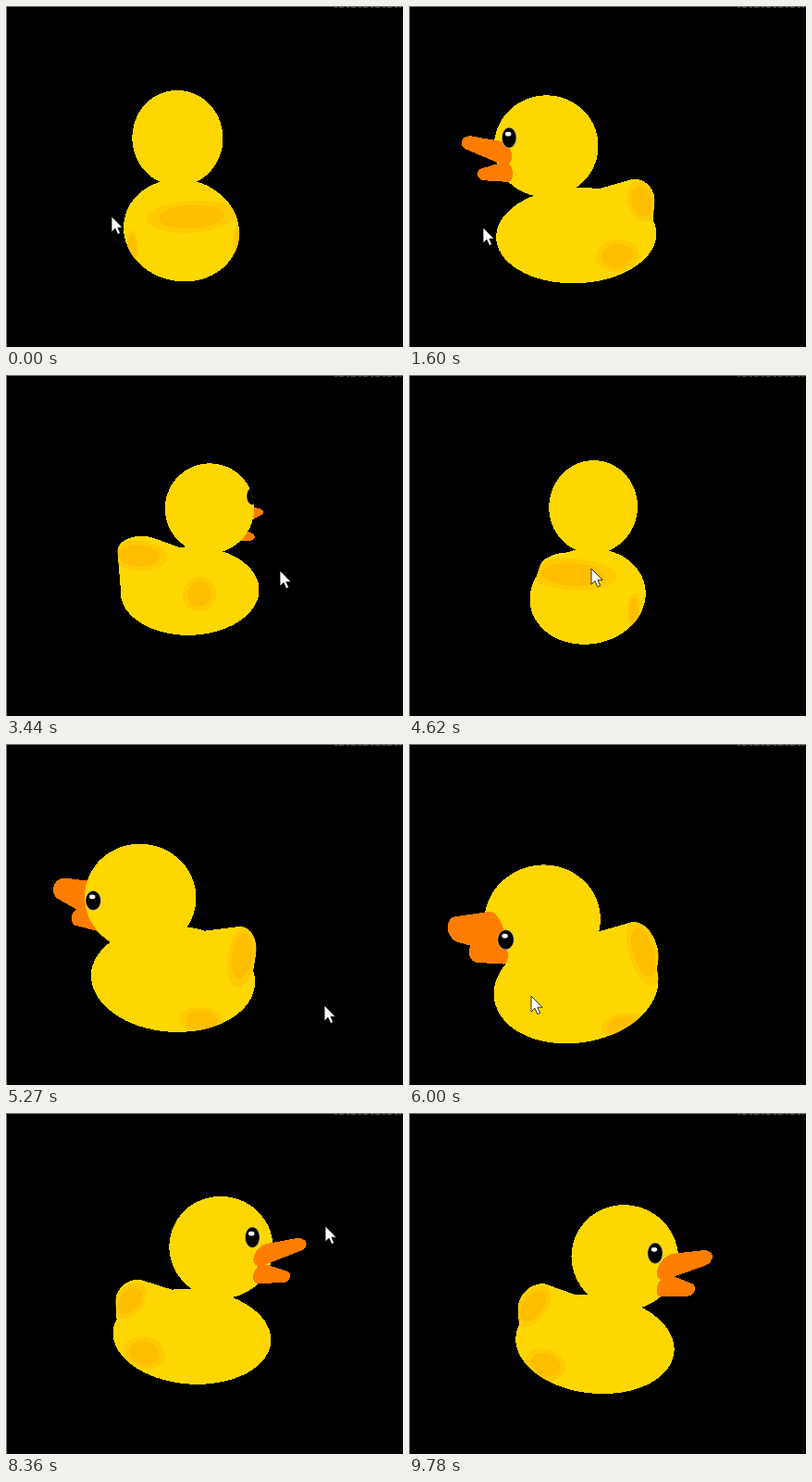
An HTML page that plays this animation: 429x368 px, repeating every 9.88 s.

```html
<!DOCTYPE html>
<html lang="en">
<head>
<meta charset="utf-8">
<title>Turning duck</title>
<style>
html, body { margin: 0; width: 100%; height: 100%; overflow: hidden; background: #000; }
svg { display: block; width: 429px; height: 368px; }
</style>
</head>
<body>
<svg viewBox="0 0 429 368">
  <defs>
    <clipPath id="bodyClip"><path id="bodyClipPath"/></clipPath>
    <clipPath id="headClip"><path id="headClipPath"/></clipPath>
  </defs>
  <rect width="429" height="368"/>
  <path d="M0 .5H429M.5 0V368" stroke="#777"/>
  <path d="M355 1.5H427" stroke="#444" stroke-dasharray="3 2 5 3"/>
  <g shape-rendering="crispEdges">
    <path id="beakBack" fill="#ff7d00"/>
    <path id="body" fill="#ffd700"/>
    <g id="patches" clip-path="url(#bodyClip)"></g>
    <path id="head" fill="#ffd700"/>
    <path id="beakFront" fill="#ff7d00"/>
  </g>
  <g id="eyes" clip-path="url(#headClip)"></g>
  <path id="cursor" d="M0 0V17L4 13.2L6.8 19.5L9.6 18.3L6.9 12.2H12Z" fill="#fff" stroke="#000" stroke-width=".8"/>
</svg>
<script>
const LOOP = 9880, CAMERA = 600, PIVOT = { x: 191, y: 295 };
const byId = id => document.getElementById(id);
const rad = deg => deg * Math.PI / 180;

// The picture is held between steps: start, end, number of steps.
const RUNS = [[140, 1070, 8], [1200, 2180, 8], [2330, 3290, 8], [3440, 4350, 8], [4500, 5540, 9],
  [5690, 6600, 7], [6750, 7670, 7], [7820, 8770, 8], [8920, 9780, 7]];
const STEPS = [0, ...RUNS.flatMap(([from, to, n]) =>
  Array.from({ length: n }, (_, i) => from + (to - from) * i / (n - 1)))];

// time, turn, tilt, lift, cursor x, cursor y
const KEYS = [
  [0, 8, 22, -2, 114, 227],
  [950, 97, 21, 0, 225, 236],
  [1200, 97, 22, 0, 200, 240],
  [1620, 97, 22, 0, 80, 239],
  [2180, 205, 4, -13, 304, 222],
  [2600, 207, 3, -14, 121, 215],
  [3440, 310, 3, -12, 296, 211],
  [3600, 316, 4, -12, 313, 212],
  [4050, 316, 5, -11, 80, 203],
  [4630, 348, 16, -5, 197, 209],
  [5400, 461, 47, -1, 371, 295],
  [5690, 463, 50, 0, 371, 298],
  [5993, 463, 50, 0, 132, 272],
  [6650, 530, 70, 0, 225, 355],
  [7210, 593, 55, 0, 310, 207],
  [7670, 602, 28, -3, 317, 120],
  [8000, 606, 20, -6, 330, 62],
  [8770, 624, 19, -6, 361, 190],
  [9600, 613, 26, 0, 361, 372],
  [9780, 612, 26, 0, 361, 400]
];

// Ellipsoids: centre and half axes, each as left, up, forward.
const BODY = { at: [0, 50, 10], size: [61, 48, 84] };
const REAR = { at: [0, 58, -22], size: [50, 38, 48] };
const TAIL = { at: [0, 88, -53], size: [33, 16, 18] };
const HEAD = { at: [0, 142, 39], size: [47.5, 50, 51] };
const onHead = (l, u, f, size) => ({ at: [l, 142 + u, 39 + f], size });
const UPPER_BEAK = [onHead(0, -6, 42, [24, 8, 8]), onHead(0, 4, 72, [14, 5, 9])];
const LOWER_BEAK = [onHead(0, -24, 40, [18, 8, 6]), onHead(0, -26, 62, [10, 5, 6])];

const patch = (normal, at, size) => [["#ffcb00", 1], ["#ffbe00", .72]].map(([fill, k]) =>
  ({ fill, normal, shape: { at, size: size.map(v => v * k) } }));
const PATCHES = [
  ...patch([0, .7, -.7], [0, 84, -58], [42, 15, 14]),
  ...[1, -1].flatMap(side => patch([side, 0, -.2], [side * 54, 45, -24], [5, 17, 21]))
];
const EYES = [1, -1].map(side => ({
  normal: [side * .68, .28, .74],
  shape: onHead(side * 32, 13, 35, [6.5, 9.5, 6.5])
}));

function addShape(parent, tag, attrs) {
  const el = document.createElementNS("http://www.w3.org/2000/svg", tag);
  for (const name in attrs) el.setAttribute(name, attrs[name]);
  return byId(parent).appendChild(el);
}
for (const p of PATCHES) p.el = addShape("patches", "path", { fill: p.fill });
for (const e of EYES) {
  e.el = addShape("eyes", "path", { fill: "#000", stroke: "#bba", "stroke-width": .7 });
  e.glint = addShape("eyes", "ellipse", { rx: 3.2, ry: 2.4, fill: "#fff" });
}

function makeView(turn, tilt, lift) {
  const st = Math.sin(rad(turn)), ct = Math.cos(rad(turn));
  const sp = Math.sin(rad(tilt)), cp = Math.cos(rad(tilt));
  const rotate = ([l, u, f]) => {
    const near = l * st - f * ct;
    return [-l * ct - f * st, near * sp - u * cp, u * sp + near * cp];
  };
  const axes = [rotate([1, 0, 0]), rotate([0, 1, 0]), rotate([0, 0, 1])];

  const project = at => {
    const [x, y, z] = rotate(at), scale = CAMERA / (CAMERA - z);
    return { x: PIVOT.x + x * scale, y: PIVOT.y + lift + y * scale, scale };
  };

  // Outline of the convex hull around projected ellipsoids.
  const hull = (...shapes) => {
    const solids = shapes.map(s => ({ c: project(s.at), size: s.size }));
    const points = [];
    for (let i = 0; i < 96; i++) {
      const a = i / 96 * 2 * Math.PI, ux = Math.cos(a), uy = Math.sin(a);
      let best = -Infinity, point;
      for (const { c, size } of solids) {
        const k = axes.map((e, j) => size[j] * (e[0] * ux + e[1] * uy));
        const n = Math.hypot(...k);
        const reach = c.x * ux + c.y * uy + c.scale * n;
        if (reach <= best) continue;
        best = reach;
        const offset = dim => axes.reduce((sum, e, j) => sum + e[dim] * size[j] * k[j], 0) / n * c.scale;
        point = (c.x + offset(0)).toFixed(1) + " " + (c.y + offset(1)).toFixed(1);
      }
      points.push(point);
    }
    return "M" + points.join("L") + "Z";
  };
  return { project, hull, facing: v => rotate(v)[2], beakNear: ct < 0 };
}

function poseAt(t) {
  const i = Math.max(1, KEYS.findIndex(k => k[0] >= t));
  const a = KEYS[i - 1], b = KEYS[i], p = (t - a[0]) / (b[0] - a[0]);
  return a.map((v, j) => v + (b[j] - v) * p);
}

function draw(t) {
  const [, turn, tilt, lift, cx, cy] = poseAt(t);
  const view = makeView(turn, tilt, lift);
  const setPath = (id, d) => byId(id).setAttribute("d", d);

  const body = view.hull(BODY) + view.hull(REAR, TAIL);
  const head = view.hull(HEAD);
  const beak = view.hull(...LOWER_BEAK) + view.hull(...UPPER_BEAK);
  setPath("body", body);
  setPath("bodyClipPath", body);
  setPath("head", head);
  setPath("headClipPath", head);
  setPath("beakBack", view.beakNear ? "" : beak);
  setPath("beakFront", view.beakNear ? beak : "");

  for (const p of PATCHES)
    p.el.setAttribute("d", view.facing(p.normal) > 0 ? view.hull(p.shape) : "");

  for (const e of EYES) {
    const seen = view.facing(e.normal) > -.05;
    const c = view.project(e.shape.at);
    e.el.setAttribute("d", seen ? view.hull(e.shape) : "");
    e.glint.setAttribute("cx", c.x - 1);
    e.glint.setAttribute("cy", c.y - 4);
    e.glint.setAttribute("visibility", view.facing(e.normal) > .3 ? "visible" : "hidden");
  }
  byId("cursor").setAttribute("transform", `translate(${Math.round(cx)} ${Math.round(cy)})`);
}

const start = performance.now();
let shown = -1;
function tick() {
  const t = (performance.now() - start) % LOOP;
  const step = STEPS.findLast(s => s <= t + 25);
  if (step !== shown) draw(shown = step);
  requestAnimationFrame(tick);
}
tick();
</script>
</body>
</html>
```
